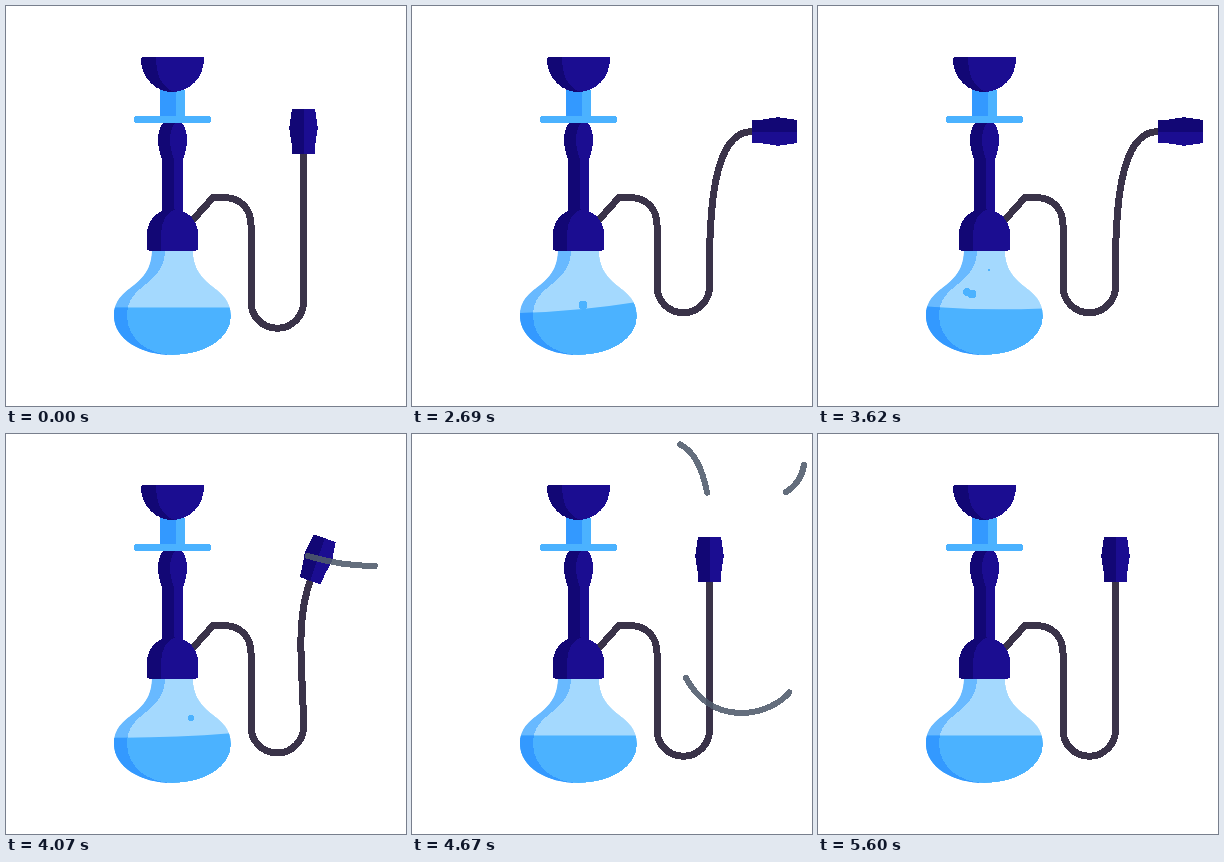
Write an HTML page that moves like this. It is 400 px wide and 400 px high and loops after 5630 ms.

```html
<!DOCTYPE html>
<html lang="en">
<head>
<meta charset="utf-8">
<title>Hookah</title>
<style>
html, body { margin: 0; width: 100%; height: 100%; overflow: hidden; background: #fff; }
svg { display: block; width: 100vw; height: 100vh; shape-rendering: crispEdges; }
.dark { fill: #120775; }
.navy { fill: #1b0d91; }
.deep { fill: #3399ff; }
.blue { fill: #4bb2ff; }
.mild { fill: #68b9ff; }
.pale { fill: #a4d9fe; }
#hose { fill: none; stroke: #3a3349; stroke-width: 7; stroke-linejoin: round; }
#smoke { fill: none; stroke: #4f5b6c; stroke-width: 6; stroke-linecap: round; opacity: .88; }
</style>
</head>
<body>
<svg viewBox="0 0 400 400">
  <defs>
    <path id="bulb" d="M146 243C146 284 108 278 108 310C108 333 135 349 166.500 349S225 333 225 310C225 278 187 284 187 243Z"/>
    <path id="shade" d="M146 243H159C159 281 121 276 121 310C121 333 143 349 166.500 349H100V243Z"/>
    <clipPath id="inBulb"><use href="#bulb"/></clipPath>
    <clipPath id="inWater"><path id="level"/></clipPath>
  </defs>

  <path id="hose"/>

  <g clip-path="url(#inBulb)">
    <use href="#bulb" class="pale"/>
    <use href="#shade" class="mild"/>
    <g id="bubbles" class="blue"></g>
    <g clip-path="url(#inWater)">
      <use href="#bulb" class="blue"/>
      <use href="#shade" class="deep"/>
    </g>
  </g>

  <path class="blue" d="M154 84H179V112H154Z"/>
  <path class="deep" d="M154 84H170V112H154Z"/>
  <rect class="blue" x="128" y="110" width="77" height="7" rx="2.500"/>
  <path class="navy" d="M157 117H176Q181 124 181 133Q181 143 177 153V207H156V153Q152 143 152 133Q152 124 157 117Z"/>
  <path class="dark" d="M157 117H169Q164 124 164 133Q164 143 168 153V207H156V153Q152 143 152 133Q152 124 157 117Z"/>
  <path class="navy" d="M141 242V228A25.500 25 0 0 1 192 228V242Q192 244.500 190 244.500H143Q141 244.500 141 242Z"/>
  <path class="dark" d="M141 242V228A25.500 25 0 0 1 170 203C161 206 155 215 155 228V244.500H143Q141 244.500 141 242Z"/>
  <path class="navy" d="M135 53Q135 51 137 51H196Q198 51 198 53A31.500 33 0 0 1 135 53Z"/>
  <path class="dark" d="M135 53Q135 51 137 51H150C150 70 156 82 169 86A31.500 33 0 0 1 135 53Z"/>

  <g id="tip">
    <path class="navy" d="M-11 0L-12 -11L-14.300 -26L-11.500 -45H11.500L14.300 -26L12 -11L11 0Z"/>
    <path class="dark" d="M-11 0L-12 -11L-14.300 -26L-11.500 -45H0V0Z"/>
  </g>

  <g id="smoke">
    <path pathLength="1" d="M302 122C322 128 345 132 369 132C402 132 406 230 374 262C352 283 300 292 274 244"/>
    <path pathLength="1" d="M300 118C299 95 300 80 295 58C290 34 282 14 262 8"/>
    <path pathLength="1" d="M302 118C305 80 345 75 374 58C384 52 390 43 392 31"/>
  </g>
</svg>
<script>
const LOOP = 5630;
const $ = id => document.getElementById(id);
const clamp = x => Math.min(1, Math.max(0, x));
const span = (t, a, b) => clamp((t - a) / (b - a));
const mix = (a, b, p) => a + (b - a) * p;
const easeOut = (x, power) => 1 - (1 - x) ** power;

function bezier(s, a, b) {
  const r = 1 - s;
  return 3 * r * r * s * a + 3 * r * s * s * b + s * s * s;
}

function swing(x) {
  let lo = 0, hi = 1;
  for (let i = 0; i < 24; i++) {
    const mid = (lo + hi) / 2;
    if (bezier(mid, .3, .5) < x) lo = mid; else hi = mid;
  }
  return bezier(lo, .13, 1);
}

// Bubbles: x, start time, radius
const bubbles = [
  [171, 2487, 5.3], [156, 2700, 5], [182, 2800, 4.5], [171, 2970, 5.5],
  [149, 3250, 5.8], [154, 3277, 6.3], [185, 3675, 4.5]
].map(([x, start, r]) => {
  const el = document.createElementNS("http://www.w3.org/2000/svg", "circle");
  el.setAttribute("cx", x);
  $("bubbles").append(el);
  return { el, start, r };
});

// Trims: head start, end, power; tail start, end, power
const puffs = [
  [3920, 4660, 1, 4280, 4900, 1],
  [4090, 5400, 5, 4370, 5440, 2],
  [4090, 4660, 3, 4160, 5560, 3]
].map((times, i) => ({ el: $("smoke").children[i], times }));

function drawHose(t) {
  const p = swing(span(t, 2000, 2610)) - swing(span(t, 3710, 4310));
  const angle = p * Math.PI / 2;
  const x = 297.5 + 42.5 * Math.max(p, 0) ** 1.2;
  const y = 148 - 22.5 * (1 - Math.cos(angle));
  const low = 296 - 15.5 * p;
  const cx = x - mix(50, 38, p) * Math.sin(angle);
  const cy = y + mix(50, 38, p) * Math.cos(angle);
  $("hose").setAttribute("d",
    `M184 217L207 191.5H217C235 191.5 245 203 245 219V${low}` +
    `A26.250 26.250 0 0 0 297.5 ${low}` +
    `C${297.5 - p} ${mix(246, 200, p)} ${cx} ${cy} ${x} ${y}`);
  $("tip").setAttribute("transform", `translate(${x} ${y}) rotate(${p * 90})`);
}

function drawWater(t) {
  const power = span(t, 2000, 2350) * (1 - span(t, 3300, 4640));
  const tilt = 5.5 * power * Math.cos(2 * Math.PI * (t - 2690) / 1300);
  $("level").setAttribute("d",
    `M108 ${301.5 + tilt}Q166 ${301.5 + 4 * Math.sqrt(power)} 225 ${301.5 - tilt}V350H108Z`);
  for (const { el, start, r } of bubbles) {
    const u = span(t, start, start + 700);
    el.setAttribute("cy", 315 - 55 * u);
    el.setAttribute("r", u > 0 ? r * Math.sqrt(1 - u) : 0);
  }
}

function drawSmoke(t) {
  for (const { el, times: [h0, h1, hp, t0, t1, tp] } of puffs) {
    const head = easeOut(span(t, h0, h1), hp);
    const tail = easeOut(span(t, t0, t1), tp);
    const length = head - tail;
    el.style.display = length > 0 ? "" : "none";
    el.style.strokeDasharray = `${Math.max(length, .0001)} 2`;
    el.style.strokeDashoffset = -tail;
  }
}

function draw() {
  const t = performance.now() % LOOP;
  drawHose(t);
  drawWater(t);
  drawSmoke(t);
  requestAnimationFrame(draw);
}
draw();
</script>
</body>
</html>
```
